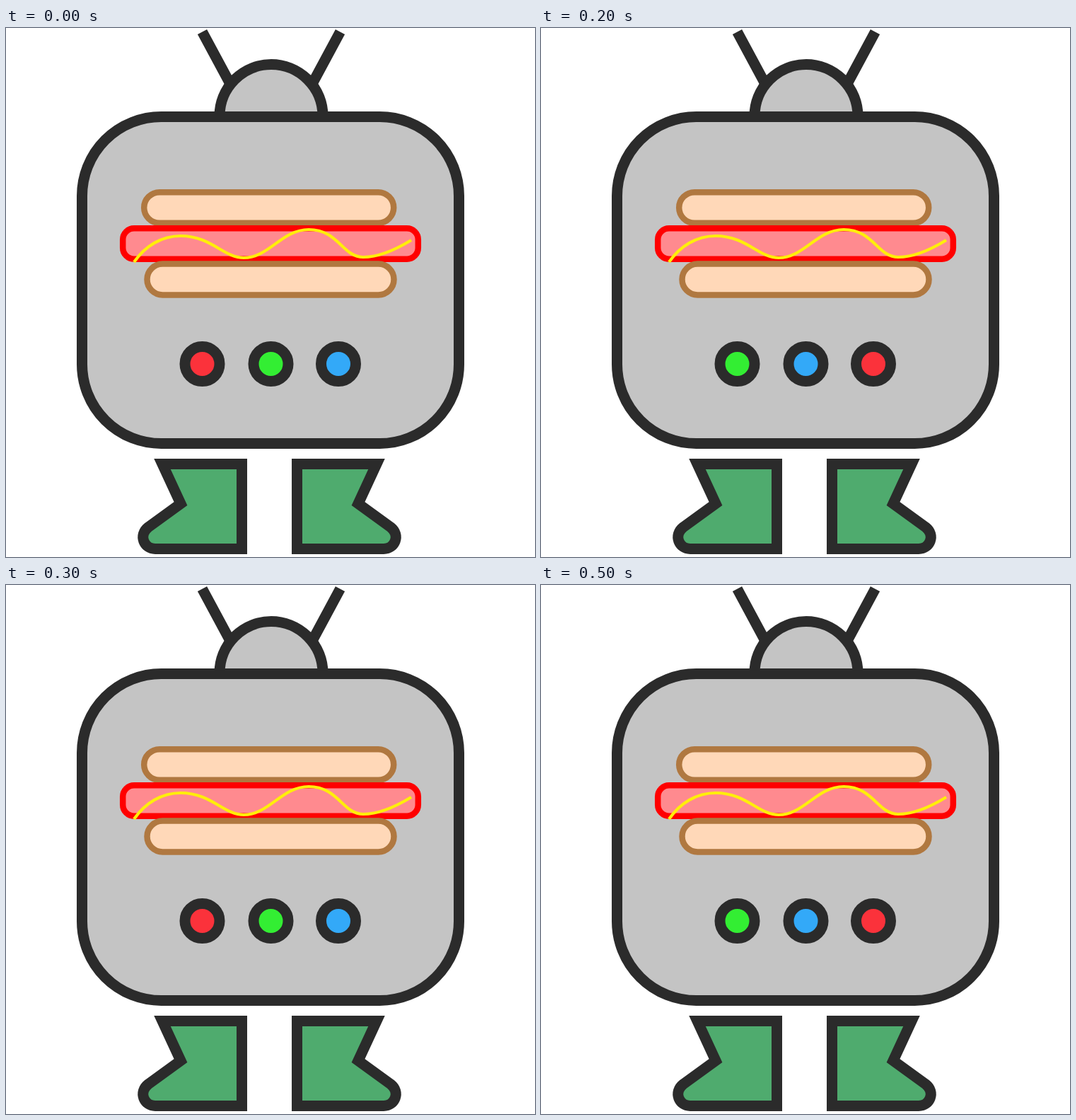
These frames come from a looping animation (748 px wide and 748 px high, 0.6 s). An HTML page:

```html
<!DOCTYPE html>
<html lang="en">
<head>
<meta charset="utf-8">
<title>Walking hot dog TV</title>
<style>
  html, body { margin: 0; width: 100%; height: 100%; overflow: hidden; background: #fff; }
  svg { display: block; width: 100%; height: 100%; }
  .ink { stroke: #2b2b2b; stroke-width: 15; }
  .metal { fill: #c4c4c4; }
  .boot { fill: #4fab6e; }
  .bun { fill: #ffd8b8; stroke: #b07840; stroke-width: 8.5; }
  .sausage { fill: #ff8a8f; stroke: #f00; stroke-width: 8.5; }
  .mustard { fill: none; stroke: #ffee0a; stroke-width: 4.2; }
</style>
</head>
<body>
<svg viewBox="0 0 748 748">
  <defs>
    <path id="boot" d="M221 616.5H333.5V736.5H211C195 736.5 187 717 201 706L247 672.5Z"/>
  </defs>

  <g id="left"><use href="#boot" class="ink boot"/></g>
  <g id="right"><use href="#boot" class="ink boot" transform="translate(745) scale(-1 1)"/></g>

  <path class="ink" fill="none" d="M277.5 5.5L316.5 78M472.5 5.5L433.5 78"/>
  <circle class="ink metal" cx="375" cy="124.5" r="73"/>
  <rect class="ink metal" x="107.5" y="125.5" width="533" height="462" rx="112"/>

  <rect class="bun" x="195.2" y="232.2" width="353" height="43.6" rx="22"/>
  <rect class="sausage" x="165.2" y="283.2" width="417.6" height="43.6" rx="16"/>
  <rect class="bun" x="199.5" y="333.6" width="349" height="43.8" rx="22"/>

  <path id="waveA" class="mustard" d="M181 331C197 308 220 294 247 294C290 294 308 325 336 325C372 325 390 285 428 285C470 285 476 324 505 324C530 324 555 311 573 300"/>
  <path id="waveB" class="mustard" d="M178 285C193 307 213 322 243 322C292 322 301 292 333 292C372 292 390 332 425 332C463 332 473 293 499 293C523 293 550 304 570 317"/>

  <circle class="ink knob" cx="277.5" cy="475" r="24.5"/>
  <circle class="ink knob" cx="374.5" cy="475" r="24.5"/>
  <circle class="ink knob" cx="470" cy="475" r="24.5"/>
</svg>
<script>
  const LOOP = 600;
  const RED = '#fb323b', GREEN = '#33ee33', BLUE = '#33a9f8';

  // Holds each value for an equal share of the loop.
  function play(el, prop, values) {
    const frames = values.map((value, i) => ({
      [prop]: value, offset: i / values.length, easing: 'steps(1, end)'
    }));
    frames.push({ [prop]: values[values.length - 1], offset: 1 });
    el.animate(frames, { duration: LOOP, iterations: Infinity });
  }

  // Tilts a boot around its middle and moves that middle.
  const lift = (x, y, toX, toY) =>
    `translate(${toX}px, ${toY}px) rotate(-13.2deg) translate(${-x}px, ${-y}px)`;

  const rest = 'translate(0px, 0px) rotate(0deg) translate(0px, 0px)';
  const leftUp = lift(275, 676.5, 275.5, 664.5);
  const rightUp = lift(470, 676.5, 471.3, 666.9);
  const $ = id => document.getElementById(id);

  play($('left'), 'transform', [rest, leftUp, rest, rest, rest, rest]);
  play($('right'), 'transform', [rest, rest, rest, rest, rightUp, rest]);

  const flipped = [0, 1, 0, 0, 1, 0];
  play($('waveA'), 'opacity', flipped.map(f => 1 - f));
  play($('waveB'), 'opacity', flipped);

  // The lights move one knob to the right at each step.
  const lights = [RED, BLUE, GREEN];
  document.querySelectorAll('.knob').forEach((knob, k) => {
    play(knob, 'fill', flipped.map((_, step) => lights[(step - k + 3) % 3]));
  });
</script>
</body>
</html>
```
